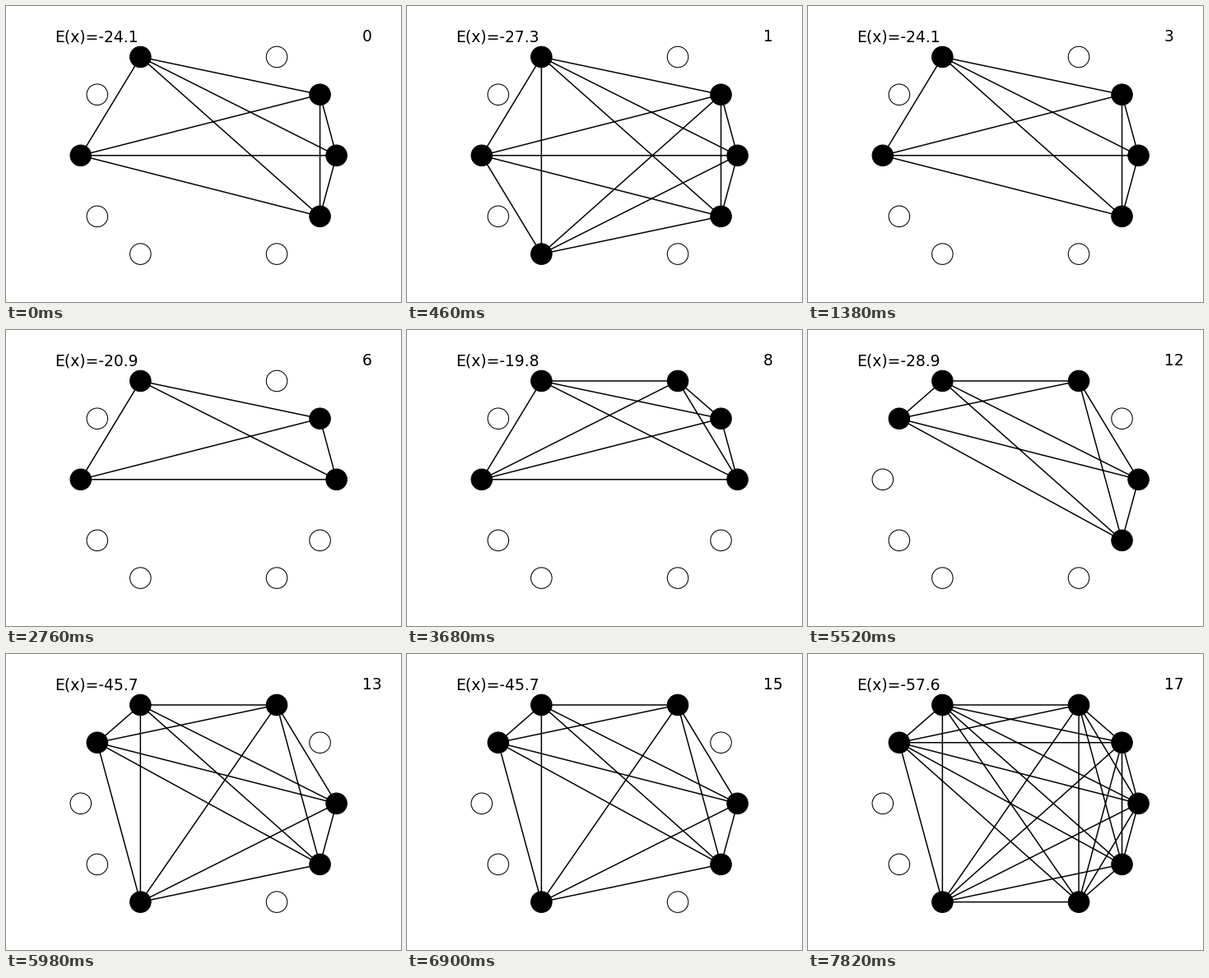
A matplotlib script that plays this animation: 480 px wide and 360 px high, repeating every 8000 ms.

```python
from itertools import combinations

import matplotlib.pyplot as plt
import numpy as np
from matplotlib.animation import FuncAnimation

W, H, DPI = 480, 360, 75
STEP_MS, LOOP_MS, TICK_MS = 460, 8000, 20
COUNT = 10

# Units sit on two half circles, counter-clockwise from the right.
angle = np.arange(COUNT) * 2 * np.pi / COUNT
nodes = np.column_stack([246.2 + 50.4 * np.sign(np.cos(angle)) + 105 * np.cos(angle),
                         181.8 - 126 * np.sin(angle)])

# The network flips one unit at a time; some steps change nothing.
START = {0, 1, 3, 5, 9}
FLIPPED = [7, 7, 9, 2, 5, 4, 9, 1, 7, 8, 1]
IDLE = {2, 4, 5, 8, 14, 15}

# Energy after a number of flips, linear between the key points.
ENERGY_KEYS = [(0, -24.1), (1, -27.3), (2, -24.1), (3, -20.9),
               (6, -17.5), (8, -28.9), (9, -45.7), (11, -57.6)]


def state_at(step):
    flips = step - sum(i <= step for i in IDLE)
    active = set(START)
    for unit in FLIPPED[:flips]:
        active ^= {unit}
    return active, np.interp(flips, *zip(*ENERGY_KEYS))


def edge_path(active):
    """Complete graph on the active units, as one broken line."""
    gap = [np.nan, np.nan]
    points = [p for a, b in combinations(sorted(active), 2)
              for p in (nodes[a], nodes[b], gap)]
    return np.array(points).T


fig = plt.figure(figsize=(W / DPI, H / DPI), dpi=DPI, facecolor="white")
ax = fig.add_axes([0, 0, 1, 1])
ax.set(xlim=(0, W), ylim=(H, 0))
ax.axis("off")

edges, = ax.plot([], [], color="black", lw=1.44, snap=False, zorder=1)
dots = ax.scatter(*nodes.T, s=600, linewidths=1, edgecolors="black",
                  snap=False, zorder=2)
font = dict(family="DejaVu Sans", size=18, color="black", va="baseline")
energy_text = ax.text(59, 43.2, "", **font)
step_text = ax.text(433, 43.2, "", **font)


def draw(frame):
    step = frame * TICK_MS // STEP_MS
    active, energy = state_at(step)
    edges.set_data(*edge_path(active))
    dots.set_facecolor(["black" if i in active else "white" for i in range(COUNT)])
    energy_text.set_text(f"E(x)={energy:.1f}")
    step_text.set_text(str(step))
    return edges, dots, energy_text, step_text


anim = FuncAnimation(fig, draw, frames=LOOP_MS // TICK_MS, interval=TICK_MS,
                     repeat=True, repeat_delay=0)
plt.show()
```
